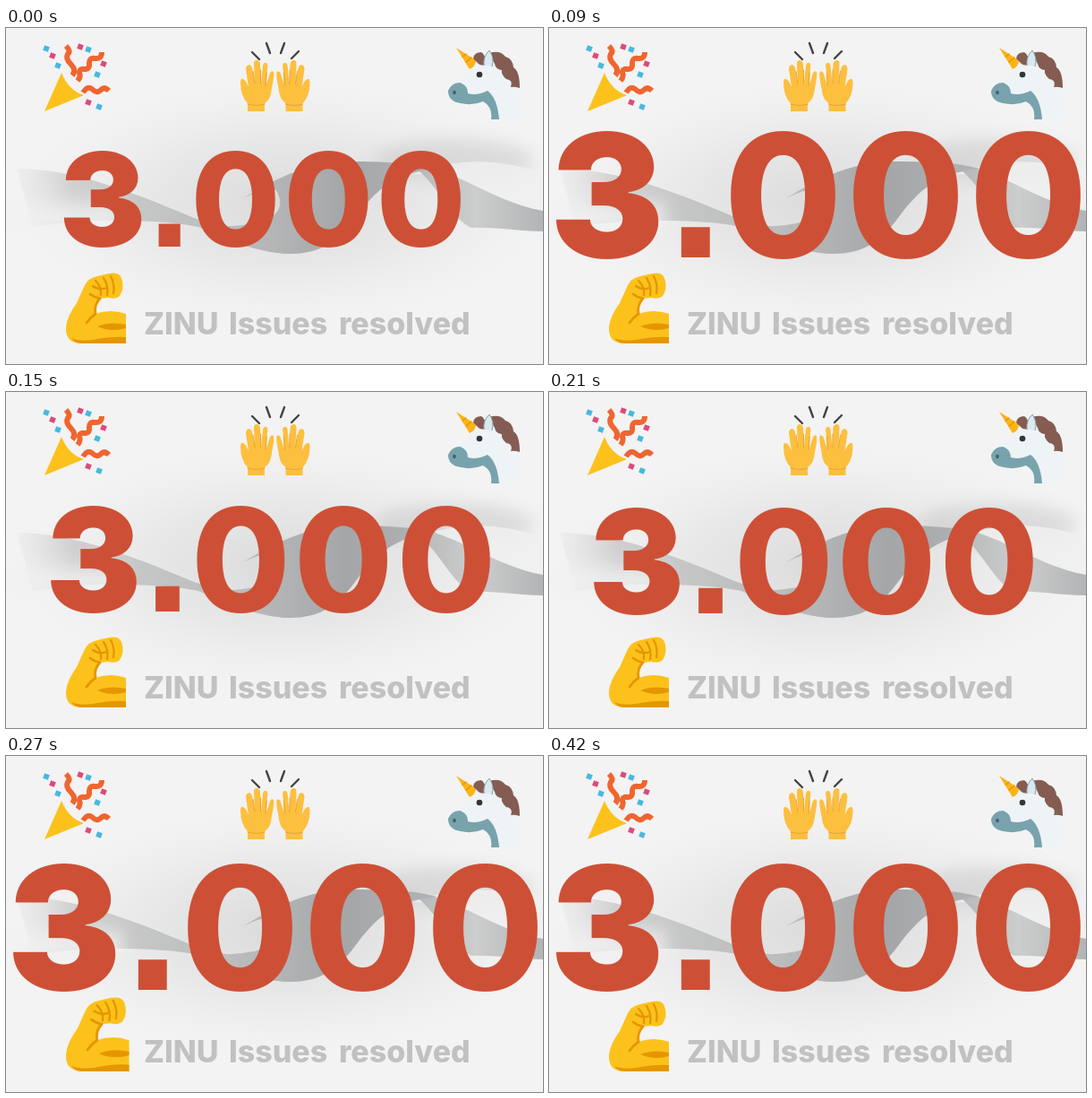
An HTML page that plays this animation: 600x375 px, repeating every 1530 ms.

```html
<!DOCTYPE html>
<html lang="en">
<head>
<meta charset="utf-8">
<title>3.000 issues resolved</title>
<style>
  html, body { margin: 0; width: 100%; height: 100%; overflow: hidden; background: #f3f3f3; }
  svg { display: block; width: 100vw; height: 100vh; }
  text { font-family: Inter, "Liberation Sans", sans-serif; }
  #number { font-size: 191px; font-weight: 800; fill: #cd5036; text-anchor: middle; }
  .heavy { font-weight: 900; }
  .dot { font: bold 226px "Liberation Sans", Arial, sans-serif; }
  .caption { font-size: 34px; font-weight: 800; fill: #c1c1c1; }
  .line { fill: none; stroke-linecap: round; stroke-linejoin: round; }
</style>
</head>
<body>
<svg viewBox="0 0 600 375">
  <defs>
    <radialGradient id="haze">
      <stop offset="0" stop-color="#c9c9c9"/>
      <stop offset=".5" stop-color="#d9d9d9" stop-opacity=".7"/>
      <stop offset="1" stop-color="#eee" stop-opacity="0"/>
    </radialGradient>
    <linearGradient id="left">
      <stop offset="0" stop-color="#ddd" stop-opacity=".2"/>
      <stop offset=".2" stop-color="#cfcfcf"/>
      <stop offset=".6" stop-color="#bfc0c0"/>
      <stop offset="1" stop-color="#b4b5b6"/>
    </linearGradient>
    <linearGradient id="fade" x1="0" y1="0" x2="0" y2="1">
      <stop offset="0" stop-color="#f1f1f1" stop-opacity="0"/>
      <stop offset=".6" stop-color="#f1f1f1" stop-opacity=".9"/>
      <stop offset="1" stop-color="#f1f1f1"/>
    </linearGradient>
    <linearGradient id="middle">
      <stop offset="0" stop-color="#c2c3c3"/>
      <stop offset=".3" stop-color="#b5b6b7"/>
      <stop offset=".62" stop-color="#a4a6a8"/>
      <stop offset="1" stop-color="#b2b3b4"/>
    </linearGradient>
    <linearGradient id="right">
      <stop offset="0" stop-color="#b4b5b6"/>
      <stop offset=".5" stop-color="#cccdcd"/>
      <stop offset="1" stop-color="#b3b4b5"/>
    </linearGradient>
    <filter id="soft" x="-30%" y="-30%" width="160%" height="160%"><feGaussianBlur stdDeviation="9"/></filter>
    <g id="hand">
      <path fill="#fdbf3e" d="M270 93V84Q262 76 262 61Q262 56 265 57Q268 58 271 66L268 46Q268 42 271 41Q274 41 275 45L278 61L277 40Q277 36 280 36Q283 36 284 40L285 61L287 42Q288 38 291 39Q293 40 292 45L291 63L295 50Q297 47 299 49Q300 53 297 67Q296 80 289 84V93Z"/>
      <path class="line" stroke="#e8a33a" stroke-width="1" d="M276 48L278 62M284.500 47V62M291 50L290 64M270 85Q280 88 289 85"/>
    </g>
  </defs>

  <rect width="600" height="375" fill="#f3f3f3"/>
  <ellipse cx="310" cy="195" rx="320" ry="145" fill="url(#haze)" opacity=".6"/>
  <ellipse cx="500" cy="148" rx="90" ry="24" fill="#bbb" opacity=".4" filter="url(#soft)"/>
  <path d="M455 163Q510 143 560 152Q590 157 600 166V204Q550 190 500 165Z" fill="#f0f0f0" opacity=".85"/>

  <path d="M12 157C70 157 130 178 210 212C250 225 290 230 330 222L320 252C270 250 240 232 215 222C190 217 160 215 130 215C90 214 65 217 30 222Z" fill="url(#left)"/>
  <path d="M0 185H130V224H0Z" fill="url(#fade)" filter="url(#soft)"/>
  <path d="M450 151C500 155 545 195 600 204V227C570 227 550 222 520 223C500 215 485 180 462 160Z" fill="url(#right)"/>
  <path d="M265 190C305 166 340 149 385 149C420 149 450 150 482 157C435 161 414 180 390 212C370 239 350 252 318 252C282 252 255 236 212 221C250 223 325 222 302 181C289 179 280 183 265 190Z" fill="url(#middle)"/>

  <g id="number">
    <text x="-235.500 -136.500 -39 98 235"><tspan class="heavy">3</tspan><tspan class="dot">.</tspan>000</text>
  </g>

  <text class="caption" y="342"><tspan x="154">ZINU</tspan><tspan x="249">Issues</tspan><tspan x="372">resolved</tspan></text>

  <!-- party popper -->
  <path fill="#fcc21b" d="M43 93L62 50Q70 70 87 75Z"/>
  <g class="line" stroke="#f0652f" stroke-width="6" style="stroke-linecap: butt">
    <path d="M74 53Q79 47 73 41Q66 34 69 29Q73 26 67 20"/>
    <path d="M80 59Q84 54 82 50Q82 45 88 46Q94 46 93 39Q93 33 99 34Q107 35 107 27"/>
    <path d="M86 72Q91 64 96 68Q102 74 106 69Q110 65 115 70"/>
  </g>
  <g id="confetti"></g>

  <!-- raised hands -->
  <use href="#hand"/>
  <use href="#hand" transform="matrix(-1 0 0 1 601.500 0)"/>
  <path class="line" stroke="#444" stroke-width="2.400" d="M275 27L283 35M291 17L295 28M311 17L307 28M327 26L319 34"/>

  <!-- unicorn -->
  <path fill="#eef3f6" d="M522 40Q542 28 560 40L574 62V102H545Q547 86 535 79Q520 86 508 83Q493 82 494 71Q497 63 508 57Q517 52 519 44Z"/>
  <path fill="#78a3ad" d="M494 70Q498 61 507 61Q516 64 516 73Q526 76 538 70Q549 78 551 102H542Q544 88 533 82Q521 87 508 84Q494 82 494 70Z"/>
  <path fill="#fcb316" d="M503 22L525 36Q525 43 518 46Z"/>
  <path class="line" stroke="#e59600" stroke-width="1.300" d="M510 32L514 29M514 38L520 33"/>
  <path fill="#855c52" d="M522 34Q523 27 531 27Q536 29 536 41Q530 43 526 38Z"/>
  <path fill="#855c52" d="M540 28Q552 24 558 32Q566 34 567 44Q574 48 574 67Q568 65 564 66Q567 58 559 57Q553 52 554 47Q547 46 546 40Z"/>
  <path fill="#dce8ee" stroke="#78a3ad" d="M534 41Q533 32 540 25Q546 33 543 43"/>
  <circle cx="529" cy="52" r="3.300" fill="#343434"/>
  <ellipse cx="501" cy="72" rx="1.800" ry="2.300" fill="#3f626b"/>

  <!-- flexed arm -->
  <g id="arm">
    <path fill="#fcc21b" d="M134 352H85Q66 352 67 334Q68 322 79 307L88 287Q92 279 102 277L115 274Q126 272 129 279Q133 290 127 299Q123 303 114 301L105 302Q98 309 100 319Q117 313 134 319Z"/>
    <path fill="#e59600" d="M73 346Q84 351 103 347Q121 344 134 345V352H85Q77 352 73 346ZM102 333Q116 327 134 331V335Q117 340 102 333Z"/>
    <path class="line" stroke="#e59600" stroke-width="2.800" d="M105 302Q98 309 100 319Q94 323 90 329M105 302Q99 301 94 297"/>
    <path class="line" stroke="#e59600" stroke-width="2.300" d="M100 282Q107 289 106 298M109 279Q115 288 113 298M117 277Q122 286 120 296M97 288Q104 293 113 290"/>
  </g>
</svg>
<script>
  const STEP = 30, LOOP = 1530;
  const byId = id => document.getElementById(id);

  // step, centre x, scale, baseline
  const numberKeys = [
    [0, 286, .757, 243.5], [3, 300.5, 1, 256], [5, 295, .838, 245],
    [6, 286, .757, 243.5], [7, 295, .838, 247], [9, 300.5, 1, 261], [14, 300.5, 1, 261]
  ];

  function poseAt(step) {
    const i = Math.max(1, numberKeys.findIndex(key => key[0] >= step));
    const a = numberKeys[i - 1], b = numberKeys[i];
    const p = (step - a[0]) / (b[0] - a[0]);
    return a.map((v, k) => v + (b[k] - v) * p);
  }

  const pink = "#db4b7c", blue = "#47b9df";
  byId("confetti").innerHTML = [
    [45, 23, blue], [52, 31, pink], [83, 21, pink], [92, 24, blue], [109, 40, pink],
    [102, 52, blue], [58, 42, blue], [92, 83, pink], [104, 88, blue]
  ].map(([x, y, c]) =>
    `<rect x="-3" y="-3" width="6" height="6" fill="${c}" transform="translate(${x} ${y}) rotate(20)"/>`
  ).join("");

  function draw() {
    const step = Math.min(14, Math.floor(performance.now() % LOOP / STEP));
    const [, x, scale, y] = poseAt(step);
    byId("number").setAttribute("transform", `translate(${x} ${y}) scale(${scale})`);
    const flex = 1 + .053 * Math.max(0, 3 - Math.abs(step - 11));
    byId("arm").setAttribute("transform", `translate(67 352) scale(${flex}) translate(-67 -352)`);
    requestAnimationFrame(draw);
  }
  draw();
</script>
</body>
</html>
```
